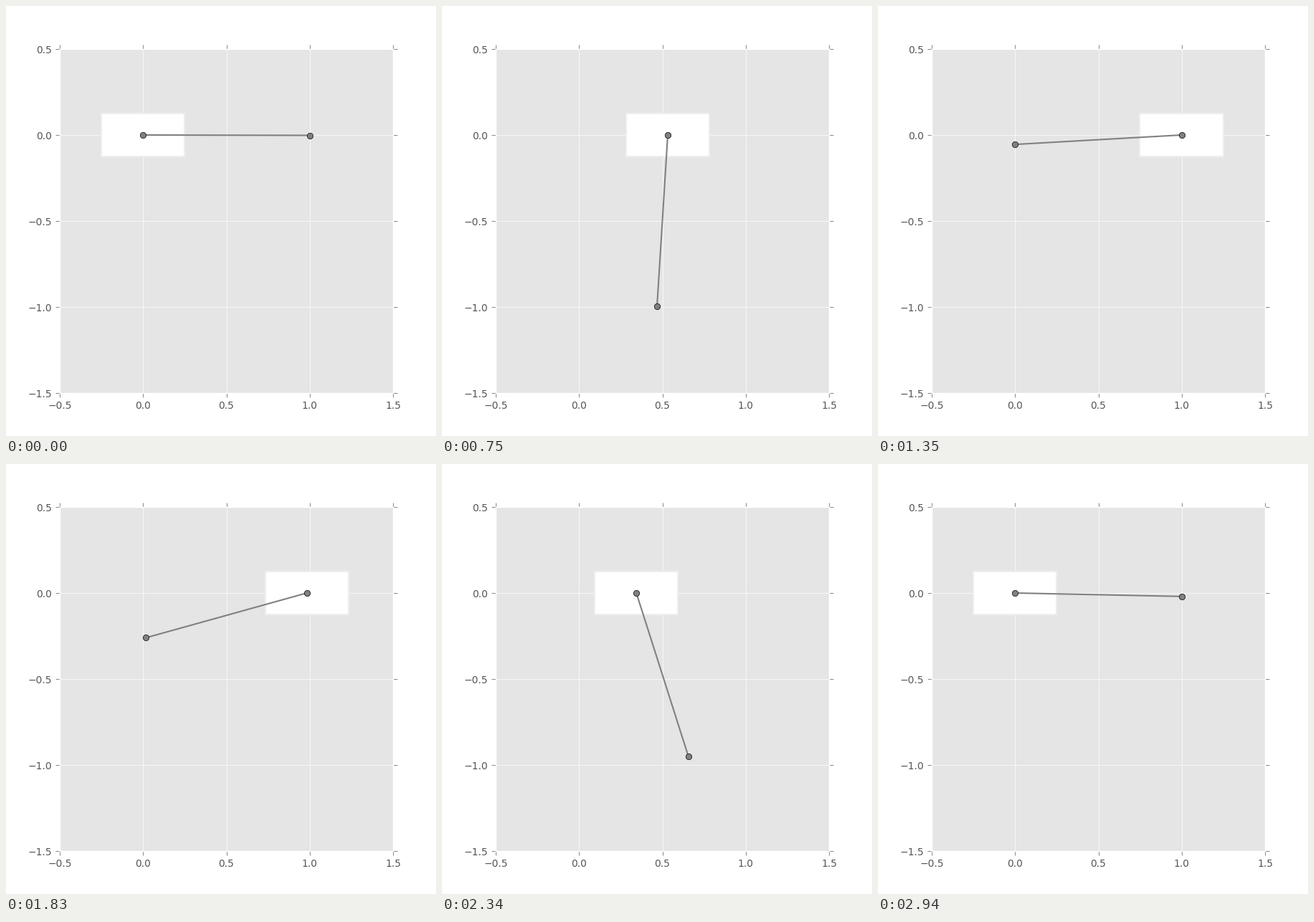
Animation, 600 px wide and 600 px high, one loop 2.97 s. Source, as a matplotlib script:

```python
import numpy as np
import matplotlib.pyplot as plt
from matplotlib.animation import FuncAnimation
from matplotlib.patches import Rectangle

FRAMES, INTERVAL = 99, 30
G, DT, SUB = 9.8, 0.02106, 10   # gravity, time per frame, solver steps per frame
CART_W, CART_H = 0.5, 0.25

plt.rcParams.update({
    "font.family": "DejaVu Sans",
    "font.size": 10,
    "axes.facecolor": "#E5E5E5",
    "axes.edgecolor": "white",
    "axes.linewidth": 1,
    "axes.axisbelow": True,
    "axes.unicode_minus": True,
})


def rate(state):
    """Free cart and bob of equal mass; phi is the rod's angle below horizontal."""
    phi, omega = state
    s2 = np.sin(phi) ** 2 / 2
    return np.array([omega, G * np.cos(phi) * (1 + s2) / (1 - s2) ** 2])


def rk4(state, h):
    a = rate(state)
    b = rate(state + h / 2 * a)
    c = rate(state + h / 2 * b)
    d = rate(state + h * c)
    return state + h / 6 * (a + 2 * b + 2 * c + d)


def swing():
    state, angles = np.zeros(2), []
    for _ in range(FRAMES):
        for _ in range(SUB):
            state = rk4(state, DT / SUB)
        angles.append(state[0])
    return np.array(angles)


phi = swing()
cart_x = 0.5 - 0.5 * np.cos(phi)
bob_x = 1 - cart_x
bob_y = -np.sin(phi)

fig = plt.figure(figsize=(6, 6), dpi=100, facecolor="white")
ax = fig.add_axes([0.125, 0.1, 0.775, 0.8])
ax.set(xlim=(-0.5, 1.5), ylim=(-1.5, 0.5),
       xticks=np.arange(-0.5, 1.6, 0.5), yticks=np.arange(-1.5, 0.6, 0.5))
ax.grid(True, color="white", linestyle="-", linewidth=0.5)
ax.tick_params(direction="out", length=4, width=0.5, pad=4, color="#555555",
               labelcolor="#555555", top=True, right=True)

cart = ax.add_patch(Rectangle((-CART_W / 2, -CART_H / 2), CART_W, CART_H,
                              facecolor="white", edgecolor="#EEEEEE", linewidth=1.5))
rod, = ax.plot([], [], "o-", color="gray", linewidth=1.5, markersize=6,
               markeredgecolor="black", markeredgewidth=0.5)


def draw(i):
    cart.set_x(cart_x[i] - CART_W / 2)
    rod.set_data([cart_x[i], bob_x[i]], [0, bob_y[i]])
    return cart, rod


anim = FuncAnimation(fig, draw, frames=FRAMES, interval=INTERVAL,
                     repeat=True, repeat_delay=0, blit=False)
plt.show()
```
